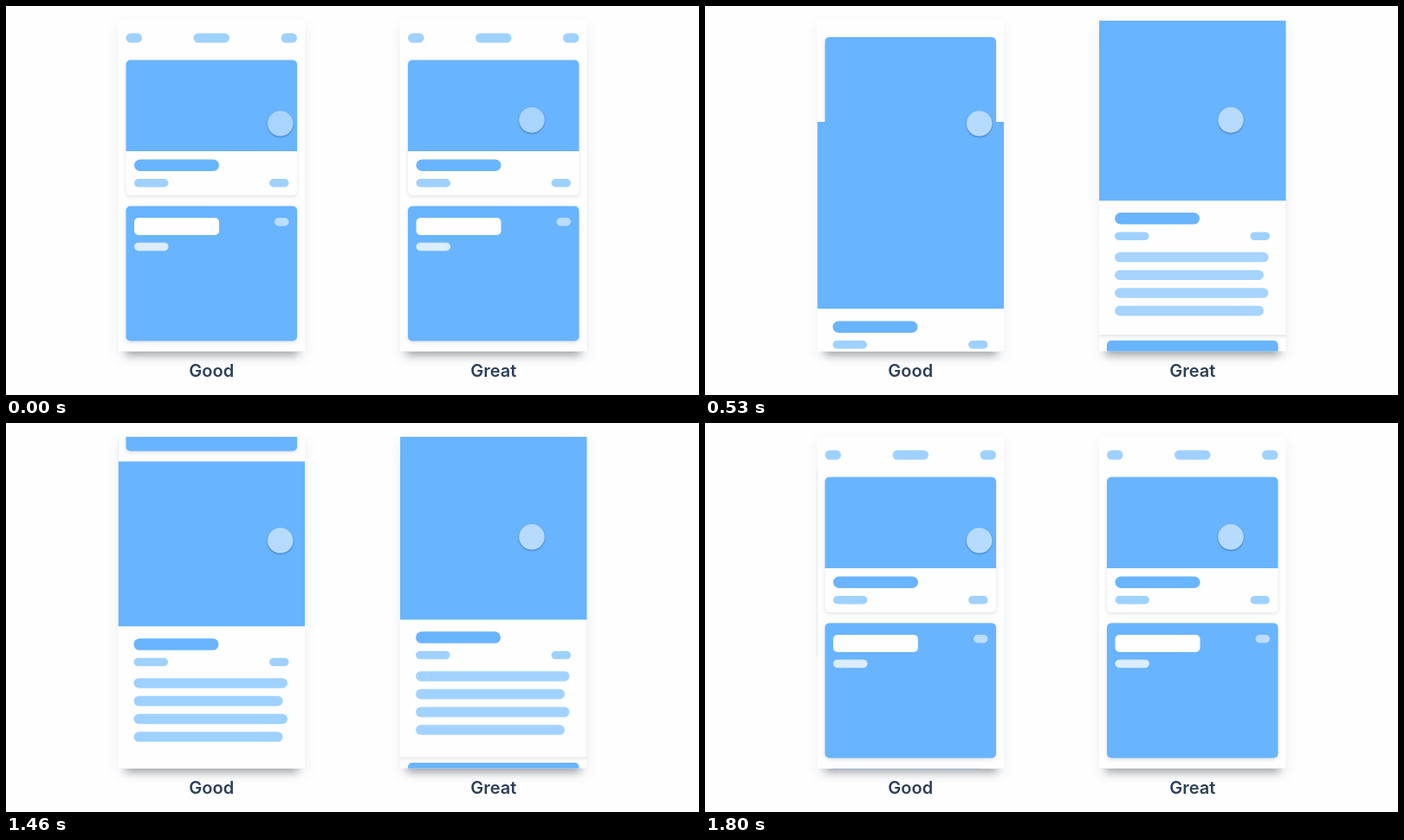
An HTML page with a canvas that plays this animation: 800 by 450 pixels, repeating every 2460 ms.

```html
<!DOCTYPE html>
<html lang="en">
<head>
<meta charset="utf-8">
<title>Good and great transitions</title>
<style>
  html, body { margin: 0; width: 100%; height: 100%; overflow: hidden; background: #fefefe; }
  canvas { display: block; width: 800px; height: 450px; }
</style>
</head>
<body>
<canvas id="stage" width="800" height="450"></canvas>
<script>
const ctx = document.getElementById('stage').getContext('2d');

const LOOP = 2460, STEP = 1000 / 15;
const PAPER = '#fefefe', BLUE = '#69b4ff', PALE = '#9fd1ff', INK = '#2d4059';
const SCREEN = { x: 129.5, y: 16, w: 215.5, h: 383.5 };
const COLUMN = 325.5;

const clamp = v => Math.min(1, Math.max(0, v));

// Timing curve with control points (x1, 0) and (x2, 1).
function ease(x, x1, x2) {
  x = clamp(x);
  let lo = 0, hi = 1;
  for (let i = 0; i < 24; i++) {
    const t = (lo + hi) / 2, u = 1 - t;
    if (3 * u * u * t * x1 + 3 * u * t * t * x2 + t * t * t < x) lo = t; else hi = t;
  }
  return lo * lo * (3 - 2 * lo);
}

function box(x, y, w, h, radius, fill) {
  ctx.fillStyle = fill;
  ctx.beginPath();
  ctx.roundRect(x, y, w, h, radius);
  ctx.fill();
}

const pill = (x, y, w, h, fill) => box(x, y, w, h, h / 2, fill);

function at(dx, dy, draw) {
  ctx.save();
  ctx.translate(dx, dy);
  draw();
  ctx.restore();
}

function withShadow(dy, blur, color, draw) {
  ctx.save();
  ctx.shadowOffsetY = dy;
  ctx.shadowBlur = blur;
  ctx.shadowColor = color;
  draw();
  ctx.restore();
}

const paper = () => box(SCREEN.x, SCREEN.y, SCREEN.w, SCREEN.h, 0, PAPER);

function header() {
  pill(138.5, 31.5, 18.5, 11, PALE);
  pill(216.5, 31.5, 41.5, 11, PALE);
  pill(317.5, 31.5, 18.5, 11, PALE);
}

function caption(x) {
  pill(x, 177.5, 98, 13.5, BLUE);
  pill(x, 200, 39.5, 9.5, PALE);
  pill(304, 200, 22.5, 9.5, PALE);
}

function bodyLines() {
  for (let i = 0; i < 4; i++) {
    pill(147.5, 292.3 + i * 20.7, i % 2 ? 172 : 177.5, 11.6, PALE);
  }
}

// The first card; p grows it from a list item to the full screen.
function openCard(p) {
  const x = 138.5 - 17 * p, w = 197.5 + 34 * p;
  const top = 62.5 - 51 * p, middle = 168 + 64.3 * p, bottom = 219 + 181 * p;
  withShadow(1.5, 4, 'rgba(30,50,80,.14)', () => box(x, top, w, bottom - top, 5, PAPER));
  box(x, top, w, middle - top, [5, 5, 0, 0], BLUE);
  at(0, 69 * p, () => caption(148 - 0.5 * p));
}

function blueCard() {
  withShadow(1.5, 4, 'rgba(30,50,80,.16)', () => box(138.5, 231.5, 197.5, 156, 5, BLUE));
  box(148, 245, 98, 20, 5, PAPER);
  pill(148, 273.7, 39.5, 9.5, 'rgba(255,255,255,.76)');
  pill(310, 245, 16.5, 9.5, 'rgba(255,255,255,.55)');
}

function listPage() {
  paper();
  header();
  openCard(0);
  blueCard();
}

function detailPage() {
  paper();
  box(SCREEN.x, SCREEN.y, SCREEN.w, 216.3, 0, BLUE);
  at(0, 69, () => caption(147.5));
  bodyLines();
}

// The incoming page slides over while the outgoing one drifts a tenth as far.
function slidePages(forth, back) {
  if (back > 0) {
    at(0, 38.4 * back, detailPage);
    at(0, -383.5 * (1 - back), listPage);
  } else {
    at(0, -38.4 * forth, listPage);
    if (forth > 0) at(0, 383.5 * (1 - forth), detailPage);
  }
}

function expandCard(p) {
  paper();
  at(0, -37.5 * p, header);
  openCard(p);
  ctx.globalAlpha = clamp(1.15 * p - 0.1);
  at(0, 69 * (p - 1), bodyLines);
  ctx.globalAlpha = 1;
  at(0, 174.5 * p, blueCard);
}

function touch(x, y, alpha) {
  const r = 14.7;
  ctx.save();
  ctx.beginPath();
  ctx.rect(x - 30, y - 30, 60, 60);
  ctx.arc(x, y, r, 0, 2 * Math.PI);
  ctx.clip('evenodd');
  withShadow(1, 2, 'rgba(20,60,110,.55)', () => pill(x - r, y - r, 2 * r, 2 * r, BLUE));
  ctx.restore();
  pill(x - r, y - r, 2 * r, 2 * r, `rgba(255,255,255,${alpha})`);
}

function phone(column, label, drawScreen) {
  const { x, y, w, h } = SCREEN;
  at(column * COLUMN, 0, () => {
    withShadow(6, 14, 'rgba(50,75,120,.09)', paper);
    withShadow(4, 9, 'rgba(0,0,0,.32)', () => box(x + 8, y + 20, w - 16, h - 20, 0, PAPER));
    ctx.save();
    ctx.beginPath();
    ctx.rect(x, y, w, h);
    ctx.clip();
    drawScreen();
    ctx.restore();
    ctx.fillStyle = INK;
    ctx.fillText(label, 237.2, 429.3);
  });
}

function render(ms) {
  const time = Math.floor((Math.floor(ms / 10) * 10 + 7) / STEP) * STEP;
  const progress = (startStep, x1, x2) => ease((time - startStep * STEP) / 400, x1, x2);
  const slide = progress(5, 0.4, 0.33);
  const expand = progress(4, 0.594, 0.27);
  const back = progress(21, 0.4, 0.33);
  const glow = time < 4 * STEP - 1 ? 0.43 : 0.52;

  ctx.fillStyle = PAPER;
  ctx.fillRect(0, 0, 800, 450);
  ctx.font = '600 20px Inter, sans-serif';
  ctx.textAlign = 'center';
  phone(0, 'Good', () => slidePages(slide, back));
  phone(1, 'Great', () => expandCard(back > 0 ? 1 - back : expand));
  touch(316.7, 135.9, glow);
  touch(607, 131.8, glow);
}

let start;
function tick(now) {
  start ??= now;
  render((now - start) % LOOP);
  requestAnimationFrame(tick);
}
requestAnimationFrame(tick);
</script>
</body>
</html>
```
